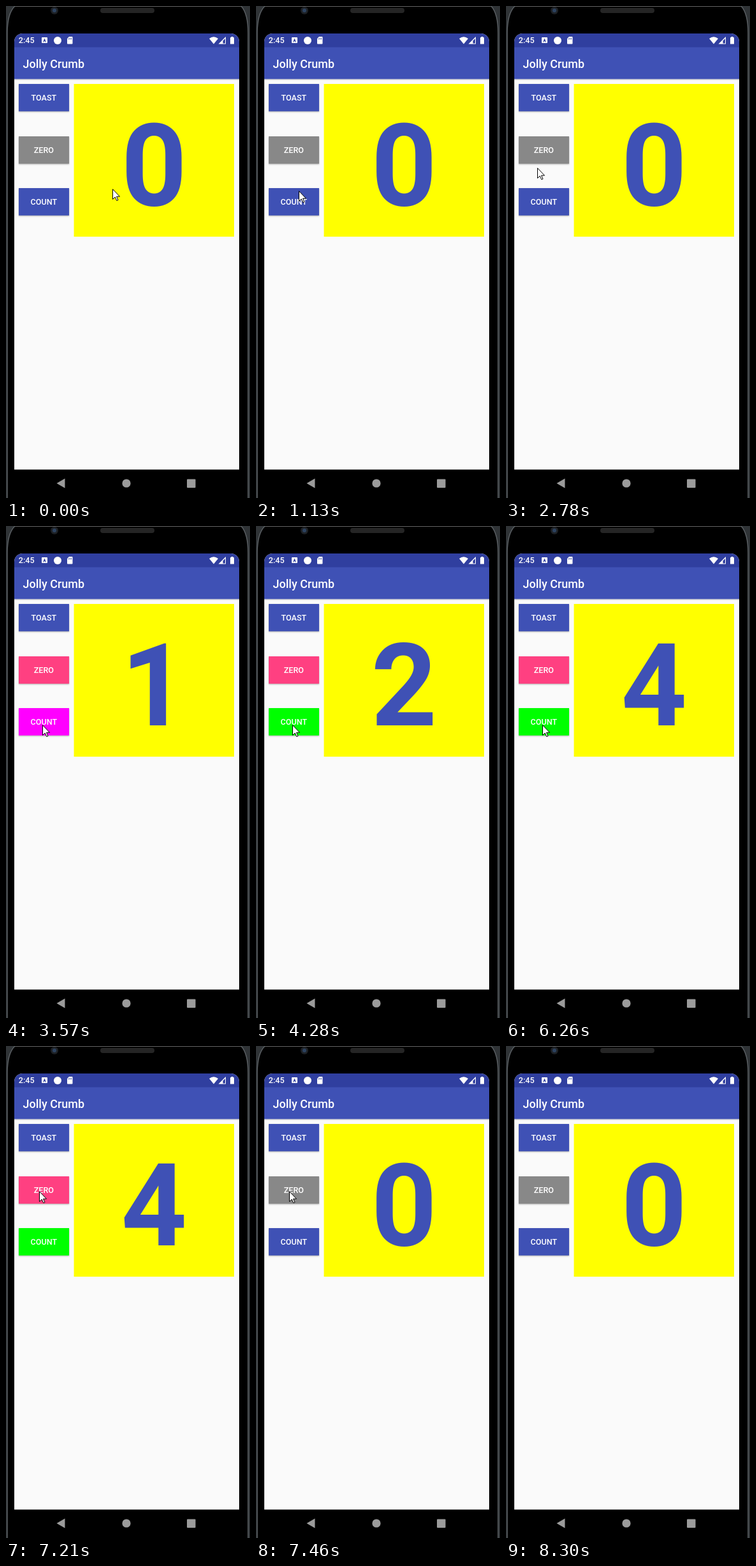
Recreate the animation shown at these times as an HTML page. Size 383 by 770 pixels, loop 8.58 s.

```html
<!DOCTYPE html>
<html lang="en">
<head>
<meta charset="utf-8">
<title>Counter app</title>
<style>
  html, body { margin: 0; width: 100%; height: 100%; overflow: hidden; background: #000; }
  svg { display: block; width: 383px; height: 770px; font-family: Roboto, sans-serif; }
  .button { filter: drop-shadow(0 1px 1px rgba(0, 0, 0, .3)); }
  .button.raised { filter: drop-shadow(0 2px 2.5px rgba(0, 0, 0, .36)); }
  .label { font-size: 12.6px; font-weight: 500; fill: #fff; text-anchor: middle; }
  #digit { font-size: 180px; font-weight: 700; fill: #3f51b5; text-anchor: middle; }
</style>
</head>
<body>
<svg viewBox="0 0 383 770">
  <defs>
    <clipPath id="screen"><rect x="13" y="43" width="353" height="720" rx="13"/></clipPath>
  </defs>

  <!-- Phone body -->
  <rect width="383" height="770"/>
  <path d="M0 0H14Q2 12 2 42V770H0ZM383 0H369Q380 12 380 42V770H383Z" fill="#303437"/>
  <path d="M14 0Q2 12 2 42V770M369 0Q380 12 380 42V770" fill="none" stroke="#5a5f63" stroke-width="1.5"/>
  <path d="M14 .5H369" stroke="#666"/>
  <rect x="148" y="3" width="85" height="8" rx="4" fill="#252525"/>
  <circle cx="76" cy="7" r="6" fill="#1e2125"/>
  <circle cx="76" cy="7" r="3" fill="#2c4260"/>

  <!-- App bars -->
  <g clip-path="url(#screen)">
    <rect x="13" y="43" width="353" height="682.5" fill="#fafafa"/>
    <rect x="13" y="114" width="353" height="2" fill="#000" opacity=".14"/>
    <rect x="13" y="64" width="353" height="50.3" fill="#3f51b5"/>
    <rect x="13" y="43" width="353" height="21.5" fill="#303f9f"/>
  </g>
  <g fill="#fff">
    <text x="19.8" y="58.3" font-size="12.6" font-weight="500">2:45</text>
    <rect x="56" y="49" width="9" height="9" rx="1"/>
    <circle cx="81" cy="54" r="6"/>
    <path d="M99 48H103.5Q104.5 48 104.5 49V58.5Q104.5 59.5 103.5 59.5H97Q96 59.5 96 58.5V51Z"/>
    <path d="M319 51Q326 45.5 333 51L326 59.5Z"/>
    <path d="M345 48V59.5H333.5Z"/>
    <path d="M353.5 49.3V48H356.5V49.3H358V59.5H352V49.3Z"/>
    <text x="26.5" y="97" font-size="18" font-weight="500">Jolly Crumb</text>
  </g>
  <g fill="#303f9f">
    <path d="M58 56.5L60.5 50.5L63 56.5H61.8L61.4 55.2H59.6L59.2 56.5Z"/>
    <path d="M98 50.5V52.5M100.2 50V52.5M102.4 50V52.5" stroke="#303f9f" stroke-width=".9"/>
    <path d="M344 51V58.5H340.5V54.5Z"/>
  </g>

  <!-- Content -->
  <rect x="106.6" y="122" width="251.4" height="239" fill="#ff0"/>
  <text id="digit" x="232.5" y="312"></text>
  <g id="buttons"></g>

  <!-- Navigation -->
  <g fill="#9b9b9b">
    <path d="M79.5 747L92.5 739.6V754.4Z"/>
    <circle cx="189" cy="747" r="6.6"/>
    <rect x="284" y="740.5" width="13.5" height="13.5" rx="1"/>
  </g>

  <path id="cursor" d="M.5 .7V16.5L4.2 13L6.8 18.6L9 17.6L6.5 12.2H11.5Z" fill="#fff" stroke="#000"/>
</svg>
<script>
const LOOP = 8580, STEP = 120;
const BLUE = '#3f51b5';
const CLICKS = [3450, 4280, 5400, 6260], RESET = 7460, EXIT = 8300;

// Each stroke goes to (x, y) in equal hard steps
const home = { x: 167, y: 286 };
const strokes = [
  { start: 150, steps: 2, x: 167, y: 278 },
  { start: 710, steps: 1, x: 137, y: 262 },
  { start: 860, steps: 2, x: 83, y: 268 },
  { start: 1130, steps: 1, x: 67, y: 289 },
  { start: 1280, steps: 2, x: 17, y: 232 },
  { start: 1550, steps: 2, x: 57, y: 231 },
  { start: 1980, steps: 2, x: 60, y: 228 },
  { start: 2780, steps: 1, x: 49, y: 253 },
  { start: 2930, steps: 2, x: 57, y: 311 },
  { start: 6970, steps: 3, x: 52, y: 227 },
  { start: 7760, steps: 1, x: 124, y: 453 },
  { start: 7910, steps: 2, x: 290, y: 719 },
  { start: 8180, steps: 1, x: 303, y: 747 }
];

const get = id => document.getElementById(id);
const digit = get('digit'), cursor = get('cursor');

get('buttons').innerHTML = ['TOAST', 'ZERO', 'COUNT'].map((name, i) => {
  const y = 122 + Math.round(i * 81.6);
  return `<rect class="button" x="20" y="${y}" width="79" height="42.8" fill="${BLUE}"/>
    <text class="label" x="59.4" y="${y + 26.3}">${name}</text>`;
}).join('');
const [, zero, count] = document.querySelectorAll('.button');

function pointer(t) {
  let { x, y } = home;
  for (const s of strokes) {
    if (t < s.start) break;
    const part = Math.min(1, (1 + Math.floor((t - s.start) / STEP)) / s.steps);
    x += (s.x - x) * part;
    y += (s.y - y) * part;
  }
  return `translate(${Math.round(x)} ${Math.round(y)})`;
}

function draw(now) {
  const t = now % LOOP;
  const n = t < RESET ? CLICKS.filter(click => click <= t).length : 0;

  digit.textContent = n;
  zero.setAttribute('fill', n ? '#ff4081' : '#888');
  count.setAttribute('fill', !n ? BLUE : n % 2 ? '#f0f' : '#0f0');
  count.classList.toggle('raised', t >= CLICKS[2] && t < CLICKS[2] + STEP);

  cursor.style.display = t < EXIT ? '' : 'none';
  cursor.setAttribute('transform', pointer(t));
}

const start = performance.now();
function tick() {
  draw(performance.now() - start);
  requestAnimationFrame(tick);
}
tick();
</script>
</body>
</html>
```
